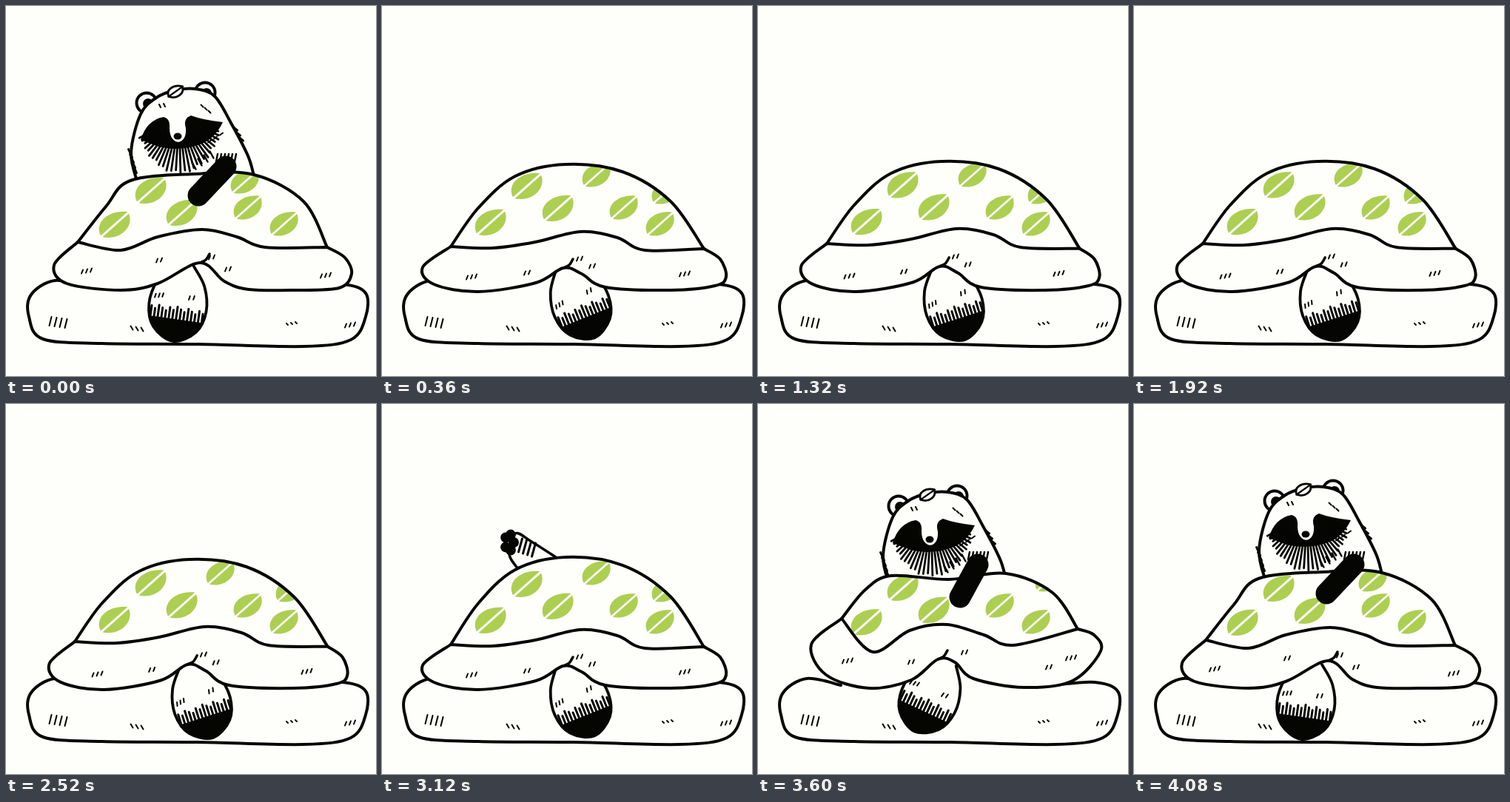
Write an HTML page with a canvas that moves like this. It is 500 px wide and 500 px high and loops after 4.2 s.

```html
<!DOCTYPE html>
<html lang="en">
<head>
<meta charset="utf-8">
<title>Sleepy raccoon dog</title>
<style>
  html, body { margin: 0; height: 100%; overflow: hidden; background: #fefefb; }
  canvas { display: block; width: 100vw; height: 100vh; }
</style>
</head>
<body>
<canvas id="stage" width="500" height="500"></canvas>
<script>
const ctx = document.getElementById('stage').getContext('2d');
const PAPER = '#fefefb', INK = '#050502', GREEN = '#accf52';
const LOOP = 4200, STEP = 120;

const clamp = v => Math.max(0, Math.min(1, v));
const smooth = v => v * v * (3 - 2 * v);
const nums = text => text.split(/[ ,]+/).map(Number);
const pose = parts => Object.fromEntries(
  Object.entries(parts).map(([key, text]) => [key, nums(text)]));
const mix = (a, b, t) => Object.fromEntries(Object.keys(a).map(key =>
  [key, a[key].map((v, i) => v + (b[key][i] - v) * t)]));

// Key points of the quilt. tail: pivot and angle; body: drop behind the quilt
// and sag of the pattern; loose: the two leaves that slide; arm: shoulder, paw.
const up = pose({
  dome: '97,319 135,271 168,236 255,227 335,228 402,264 434,326',
  edge: '65,350 82,375 155,384 205,375 262,347 295,372 328,383 390,384 450,381 467,362 458,340',
  hem: '350,326 312,312 265,302 205,312 155,330',
  marks: '103,359 204,344 275,340 297,356 426,365',
  tail: '240,350 98', body: '0,6', loose: '323,238 412,230', arm: '297,217 260,256'
});
const peek = pose({
  dome: '113,290 145,251 180,232 258,237 335,229 398,255 432,304',
  edge: '72,325 92,366 150,384 207,373 243,345 266,349 291,371 360,383 425,374 463,334 454,312',
  hem: '345,326 305,312 255,298 205,306 155,335',
  marks: '115,348 204,349 276,336 390,356 417,344',
  tail: '255,348 115', body: '7,5', loose: '290,222 394,238', arm: '297,217 273,261'
});
const flat = { ...pose({
  dome: '93,325 130,273 180,230 248,214 325,224 390,264 435,328',
  edge: '55,353 70,376 130,386 208,374 245,354 270,362 302,380 390,384 450,378 465,366 457,342',
  hem: '355,330 318,313 268,305 207,319 150,327',
  marks: '115,367 193,361 264,342 281,352 403,363',
  tail: '248,352 68', body: '130,0', loose: '290,229 384,252'
}), arm: up.arm };
const reach = { ...flat, dome: flat.dome.map((v, i) => i % 2 ? v - 7 * Math.sin(Math.PI * (i - 1) / 12) : v) };

// Breathing in lifts the dome and draws in the sides of the quilt.
function breathe(b) {
  const swell = points => points.map((v, i) => {
    const x = points[i & ~1], y = points[i | 1];
    return i % 2
      ? y - 8 * b * clamp((380 - y) / 50) * clamp((440 - x) / 80)
      : x - (x - 259) * .035 * b * clamp((y - 325) / 25);
  });
  const [x, y, angle] = flat.tail;
  return {
    ...flat, dome: swell(flat.dome), edge: swell(flat.edge), hem: swell(flat.hem),
    marks: swell(flat.marks), tail: [x, y, angle + 9 * b], body: [130, -3 * b]
  };
}

function poseAt(time) {
  const t = Math.floor(time / STEP) * STEP;
  if (t < 360) return mix(up, flat, smooth(t / 360));
  if (t < 3120) {
    const phase = (t - 360) % 1200;
    return breathe(phase < 360 ? 0 : phase >= 600 && phase < 960 ? 1 : .5);
  }
  if (t < 3240) return reach;
  if (t < 3600) return mix(reach, up, smooth((t - 3120) / 360));
  return mix(peek, up, smooth((t - 3600) / 480));
}

// Smooth curve through points; several runs join into one outline.
function curve(...runs) {
  const path = new Path2D();
  runs.forEach((run, r) => {
    const at = i => {
      const k = Math.max(0, Math.min(run.length / 2 - 1, i)) * 2;
      return [run[k], run[k + 1]];
    };
    if (!r) path.moveTo(...at(0));
    for (let i = 0; i < run.length / 2 - 1; i++) {
      const [a, b, c, d] = [at(i - 1), at(i), at(i + 1), at(i + 2)];
      path.bezierCurveTo(b[0] + (c[0] - a[0]) / 6, b[1] + (c[1] - a[1]) / 6,
        c[0] - (d[0] - b[0]) / 6, c[1] - (d[1] - b[1]) / 6, ...c);
    }
  });
  return path;
}
function oval(x, y, rx, ry = rx) {
  const path = new Path2D();
  path.ellipse(x, y, rx, ry, 0, 0, 2 * Math.PI);
  return path;
}
function paint(path, fill, width) {
  if (fill) { ctx.fillStyle = fill; ctx.fill(path); }
  if (width) { ctx.strokeStyle = INK; ctx.lineWidth = width; ctx.stroke(path); }
}
function line(x1, y1, x2, y2, width = 2, color = INK) {
  ctx.strokeStyle = color;
  ctx.lineWidth = width;
  ctx.beginPath();
  ctx.moveTo(x1, y1);
  ctx.lineTo(x2, y2);
  ctx.stroke();
}
// A row of short strokes, each (dx, dy) long.
function ticks(x, y, count, dx = -2, dy = 5, gapX = 6, gapY = -1, width = 2) {
  for (let i = 0; i < count; i++) {
    const px = x + i * gapX, py = y + i * gapY;
    line(px - dx / 2, py - dy / 2, px + dx / 2, py + dy / 2, width);
  }
}
function placed(x, y, angle, size, draw) {
  ctx.save();
  ctx.translate(x, y);
  ctx.rotate(angle * Math.PI / 180);
  ctx.scale(size, size);
  draw();
  ctx.restore();
}
function inside(path, draw) {
  ctx.save();
  ctx.clip(path);
  draw();
  ctx.restore();
}

const mattress = curve(nums('112,380 66,371 34,390 31,420 50,450 130,456 260,457 402,460 466,451 486,420 486,388 455,376 400,380'));
const body = curve(nums('178,240 169,198 182,146 203,124 228,114 256,112 282,122 304,158 328,205 337,240'));
const mask = new Path2D('M182 181Q190 154 213 150Q222 152 221 165C221 190 245 190 243 165Q239 152 250 148Q266 154 293 157Q282 180 262 187Q234 197 206 190Z');
const leaf = new Path2D('M-24 2C-22-20 6-22 25-4C22 18-8 22-24 2Z');
const halfTail = [[0, 14], [25, 32], [58, 39], [88, 29], [104, 0]];
const tail = curve([...halfTail, ...halfTail.slice(0, -1).reverse().map(([x, y]) => [x, -y])].flat());

function drawLeaf(fill, vein, width, outline) {
  paint(leaf, fill, outline);
  line(-25, 2, 27, -3, width, vein);
}

function drawRaccoon(drop) {
  ctx.save();
  ctx.translate(0, drop);
  for (const [x, y] of [[190, 131], [269, 117]]) {
    paint(oval(x, y, 13.5), PAPER, 4);
    paint(oval(x + 2, y + 1, 7), INK);
  }
  paint(body, PAPER, 4);
  ticks(168, 199, 4, 5, 11, 2, 7, 3);
  ticks(310, 166, 3, 5, 4, 4, 7, 3);

  paint(mask, INK);
  for (let i = 0; i <= 27; i++) {
    const angle = (20 + i * 4.9) * Math.PI / 180;
    const far = 58 + 16 * Math.sin(angle) ** 4 + i * 7 % 5 - 2;
    const c = Math.cos(angle), s = Math.sin(angle);
    line(234 + 36 * c, 150 + 36 * s, 234 + far * c, 150 + far * s, 2.8);
  }
  paint(oval(232, 176, 5.5, 4.5), INK);
  ticks(208, 135, 2, 2, 4);
  ticks(265, 135, 3, 3, 3, 5, 4);
  ticks(275, 183, 3, 4, -3, 8, -5);
  ticks(254, 216, 4, 5, 9, 8, -5, 2.5);
  placed(229, 116, -30, .46, () => drawLeaf(PAPER, INK, 5, 6));
  ctx.restore();
}

function drawReachingPaw() {
  paint(curve([184, 223, 172, 203, 180, 175, 202, 186, 238, 209]), PAPER, 3.5);
  for (let i = 0; i < 5; i++) paint(oval(172 + 6 * Math.cos(i * 1.26), 187 + 11 * Math.sin(i * 1.26), 7), INK);
  ticks(187, 191, 4, -5, 18, 6, 2, 3);
}

function drawArm([x, y, pawX, pawY]) {
  line(x, y, pawX, pawY, 29);
  ticks(x - 12, y - 12, 6, -2, 10, 5, 0, 2.5);
}

function drawLeaves([x4, y4, x7, y7], sag) {
  const spots = [[147, 293 + sag / 2], [196, 244 + sag], [238, 274 + sag], [327, 273], [376, 295], [x4, y4], [x7, y7]];
  spots.forEach(([x, y], i) => placed(x, y, -36, i < 3 ? 1 : .91,
    () => drawLeaf(GREEN, PAPER, 3)));
}

function drawTail([x, y, angle]) {
  placed(x, y, angle, 1, () => {
    paint(tail, PAPER);
    inside(tail, () => {
      ctx.fillStyle = INK;
      ctx.fillRect(74, -50, 50, 100);
      for (let i = 0; i < 17; i++) line(57 + i * 5 % 8, i * 5 - 40, 76, i * 5 - 40, 3);
    });
    paint(tail, null, 3.8);
    ticks(44, 22, 3, 5, 1, 1, 5);
    ticks(42, -20, 2, 5, 1, 1, 6);
  });
}

function draw(p) {
  const [drop, sag] = p.body;
  ctx.fillStyle = PAPER;
  ctx.fillRect(0, 0, 500, 500);
  ctx.lineCap = ctx.lineJoin = 'round';

  paint(mattress, null, 4);
  ticks(60, 426, 4, -3, 12, 7, 1);
  ticks(170, 435, 3, 3, 5, 7, 1);
  ticks(380, 430, 3, 2, 2);
  ticks(459, 432, 3, -2, 5);

  if (p === reach) drawReachingPaw();
  else if (drop < 110) drawRaccoon(drop);

  const left = p.dome.slice(0, 2), right = p.dome.slice(-2);
  const hem = [...right, ...p.hem, ...left];
  const top = curve(p.dome, hem);
  paint(top, PAPER);
  inside(top, () => drawLeaves(p.loose, sag));
  paint(curve(p.dome), null, 4);
  if (drop < 60) drawArm(p.arm);

  drawTail(p.tail);
  paint(curve([...left, ...p.edge, ...right], hem), PAPER, 4);
  const [notchX, notchY] = p.edge.slice(8, 10);
  paint(curve([notchX, notchY, notchX + 8, notchY - 4, notchX + 13, notchY - 12]), null, 3.5);
  [3, 2, 2, 2, 3].forEach((count, i) => ticks(p.marks[2 * i], p.marks[2 * i + 1], count));
}

function frame() {
  draw(poseAt(performance.now() % LOOP));
  requestAnimationFrame(frame);
}
frame();
</script>
</body>
</html>
```
